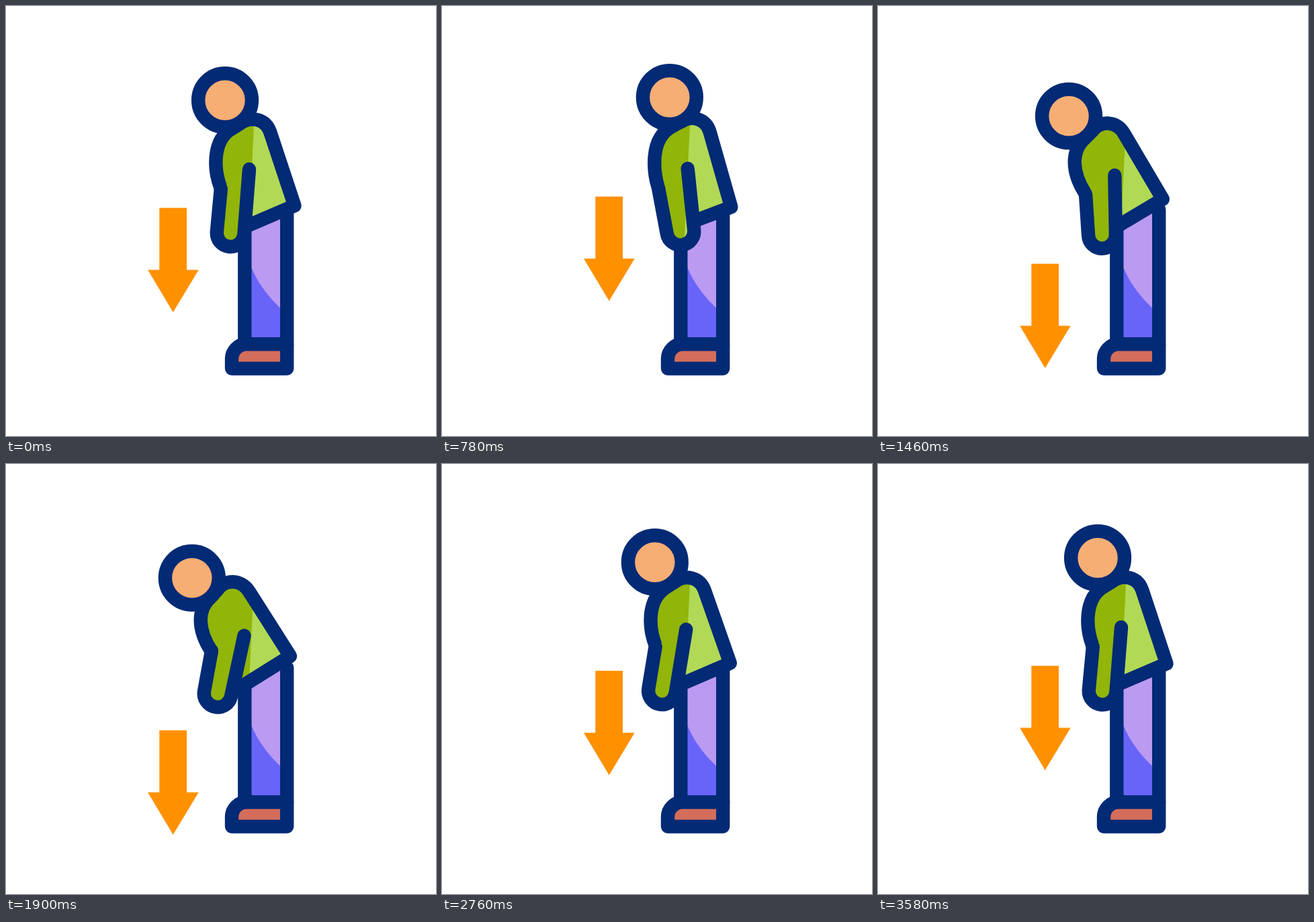
Write an HTML page without scripts that moves like this. It is 640 by 640 pixels and loops after 3.6 s.

```html
<!DOCTYPE html>
<html lang="en">
<head>
<meta charset="utf-8">
<title>Bending down</title>
<style>
  html, body { margin: 0; width: 100%; height: 100%; overflow: hidden; background: #fff; }
  svg { display: block; width: 100vw; height: 100vh; }

  .line { fill: none; stroke: #032a75; stroke-width: 20.4; stroke-linecap: round; stroke-linejoin: round; }
  .light { fill: #b1d955; }
  .dark { fill: #91b508; clip-path: url(#shade); }

  .arrow, .torso, .arm { animation: 3600ms infinite; }
  .arrow { animation-name: drop; }
  .torso { animation-name: bend; }
  .arm { animation-name: swing; }
  .head { animation: head-x 3600ms infinite, head-y 3600ms infinite; }

  @keyframes drop {
    0%, 100% { transform: translateY(300.5px); animation-timing-function: cubic-bezier(.4, 0, .6, 1); }
    17.2% { transform: translateY(277.7px); animation-timing-function: cubic-bezier(.36, 0, .3, 1); }
    52.8% { transform: translateY(396.4px); animation-timing-function: cubic-bezier(.8, 0, .5, 1); }
    87% { transform: translateY(277.7px); animation-timing-function: cubic-bezier(.4, 0, .6, 1); }
  }

  @keyframes bend {
    0%, 100% {
      d: path("M319.6 271 C314.6 258 312.3 246 312.3 233.8 C312.3 210.5 319.5 194 333 184.5 L349 174.5 C365.7 163 386.5 168.6 393.1 187.4 L429.5 297.2 L356.5 328.3");
      animation-timing-function: cubic-bezier(.4, 0, .6, 1);
    }
    17.2% {
      d: path("M322.5 269 C319 257 317.6 245 317.6 234 C317.6 209 325 191 340 181 L357 171.5 C375 161 395 168 400.5 187 L430.8 300 L358 326.5");
      animation-timing-function: cubic-bezier(.36, 0, .3, 1);
    }
    52.8% {
      d: path("M306 279 C296 264 290 250 289.7 233 C289.5 217 296 206 305 198 L315 187 C326 171 350 171 362 190 L423 286 L351 331");
      animation-timing-function: cubic-bezier(.8, 0, .5, 1);
    }
    87% {
      d: path("M322.5 269 C319 257 317.6 245 317.6 234 C317.6 209 325 191 340 181 L357 171.5 C375 161 395 168 400.5 187 L430.8 300 L358 326.5");
      animation-timing-function: cubic-bezier(.4, 0, .6, 1);
    }
  }

  @keyframes swing {
    0%, 100% {
      d: path("M362 243 L354.3 340.7 A20.4 20.4 0 0 1 313.7 337.3 L319.8 272");
      animation-timing-function: cubic-bezier(.4, 0, .6, 1);
    }
    21.67% {
      d: path("M365.7 242 L375.2 333.2 A20.4 20.4 0 0 1 334.8 338.8 L322 270.5");
      animation-timing-function: cubic-bezier(.4, .2, .7, .8);
    }
    40.56% {
      d: path("M352.3 252 L353.9 339.5 A20.4 20.4 0 0 1 313.1 341.5 L309 280");
      animation-timing-function: cubic-bezier(.3, .4, .6, 1);
    }
    52.78% {
      d: path("M354.5 255.5 L335 346 A20.4 20.4 0 0 1 295 338 L306 278");
      animation-timing-function: cubic-bezier(.6, 0, .9, .7);
    }
    67.78% {
      d: path("M356.5 253 L337.5 344.5 A20.4 20.4 0 0 1 297.5 336.5 L308.5 277");
      animation-timing-function: cubic-bezier(.3, .35, .6, 1);
    }
    86.67% {
      d: path("M367 242.5 L353.2 339 A20.4 20.4 0 0 1 312.8 333 L322.7 269");
      animation-timing-function: cubic-bezier(.4, 0, .6, 1);
    }
  }

  @keyframes head-x {
    0% { cx: 326px; animation-timing-function: cubic-bezier(.4, 0, .6, 1); }
    17.8% { cx: 341.3px; animation-timing-function: cubic-bezier(.36, 0, .3, 1); }
    52.8% { cx: 276.8px; animation-timing-function: cubic-bezier(.87, 0, .5, 1); }
    88% { cx: 339.8px; animation-timing-function: cubic-bezier(.4, 0, .6, 1); }
    100% { cx: 327px; }
  }

  @keyframes head-y {
    0% { cy: 140.2px; animation-timing-function: cubic-bezier(.4, 0, .6, 1); }
    17.8% { cy: 134.8px; animation-timing-function: cubic-bezier(.36, 0, .45, 1); }
    52.8% { cy: 169.6px; animation-timing-function: cubic-bezier(.8, 0, .5, 1); }
    88% { cy: 135.9px; animation-timing-function: cubic-bezier(.4, 0, .6, 1); }
    100% { cy: 139.8px; }
  }
</style>
</head>
<body>
<svg viewBox="0 0 640 640">
  <clipPath id="shade"><path d="M0 0H377.5L346.8 640H0Z"/></clipPath>

  <path class="arrow" fill="#ff9000" d="M228.3 0H269V92.3H286.7L248.7 155.3L211 92.3H228.3Z"/>

  <!-- legs and shoe -->
  <path fill="#bb9af2" d="M355.3 326L418.2 292V503H355.3Z"/>
  <path fill="#6864f8" d="M355.3 355C362 396 386 432 418.2 458V503H355.3Z"/>
  <path class="line" d="M355.3 331V503M418.2 303V503"/>
  <path class="line" style="fill:#d46d5b" d="M336 539.6H418.2V503.3H358C345.8 503.3 336 513 336 525Z"/>

  <!-- the arm covers the hem, so it comes after the torso outline -->
  <path class="torso light"/>
  <path class="torso dark"/>
  <path class="torso line"/>
  <path class="arm light"/>
  <path class="arm dark"/>
  <path class="arm line"/>

  <circle class="head line" style="fill:#f6ae74" r="39.9"/>
</svg>
</body>
</html>
```
